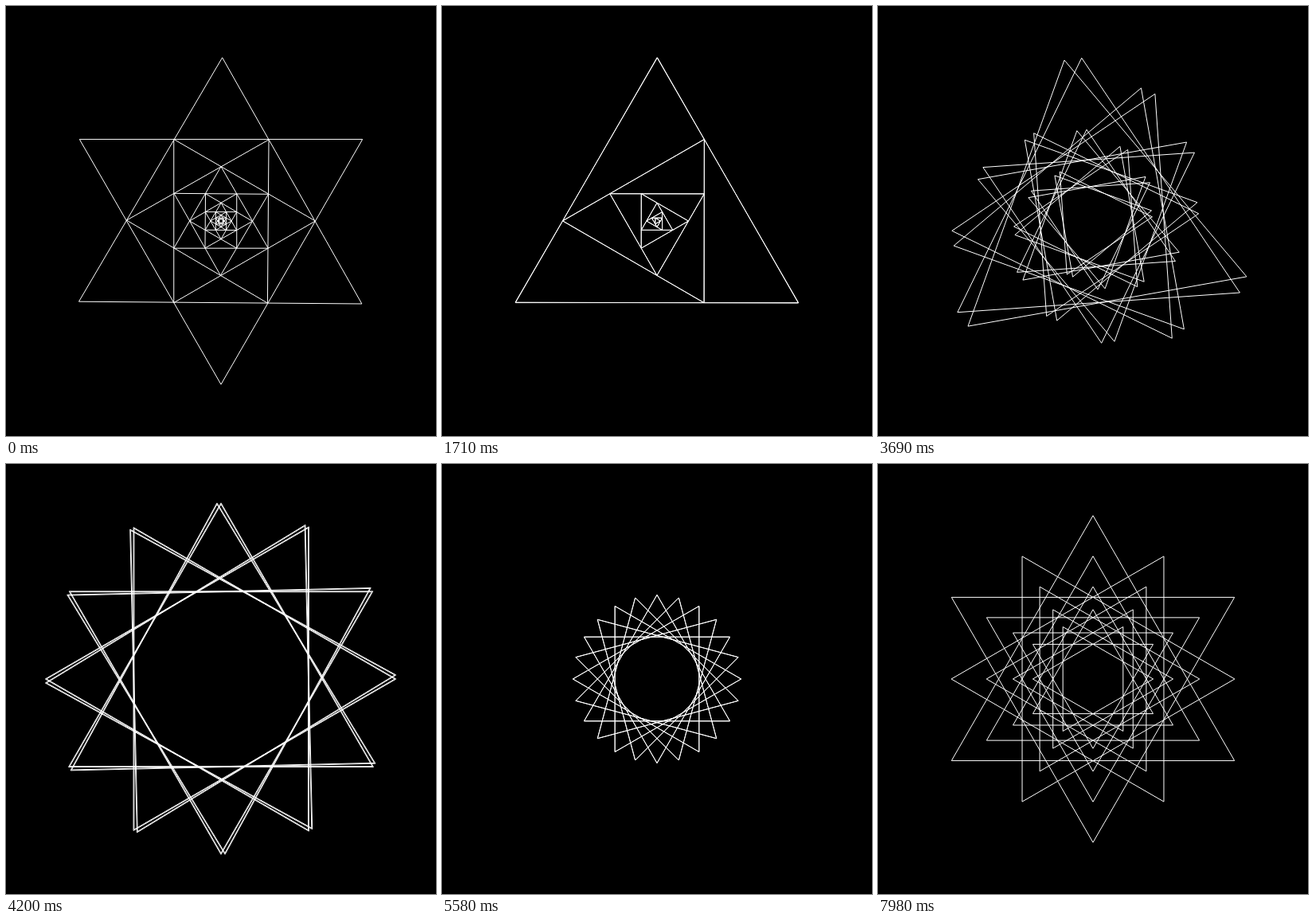
These frames come from a looping animation (540 by 540 pixels, 8 s). An HTML page with a canvas:

```html
<!DOCTYPE html>
<html lang="en">
<head>
<meta charset="utf-8">
<title>Triangle spirals</title>
<style>
  html, body { margin: 0; width: 100%; height: 100%; overflow: hidden; background: #000; }
  canvas { display: block; }
</style>
</head>
<body>
<canvas id="stage" width="540" height="540"></canvas>
<script>
const ctx = document.getElementById('stage').getContext('2d');
const LOOP = 8000, CENTER = 270, RADIUS = 205.2, LEVELS = 8;
const TIGHT = 1 / Math.sqrt(3);
const RAD = Math.PI / 180;

const clamp = x => Math.min(1, Math.max(0, x));
const mix = (a, b, p) => a + (b - a) * p;
const progress = (t, start, span) => clamp((t - start) / span);
const sine = p => (1 - Math.cos(Math.PI * p)) / 2;
const cubic = p => p < 0.5 ? 4 * p ** 3 : 1 - 4 * (1 - p) ** 3;
const ease = (t, start, span) => cubic(progress(t, start, span));

function triangle(radius, degrees) {
  for (let i = 0; i < 3; i++) {
    const a = (degrees - 90 + i * 120) * RAD;
    ctx.lineTo(CENTER + radius * Math.cos(a), CENTER + radius * Math.sin(a));
  }
  ctx.closePath();
}

// Each level is turned 30 degrees and scaled by the ratio.
function spiral(radius, ratio, degrees, levels = LEVELS) {
  for (let i = 0; i < levels; i++) {
    ctx.beginPath();
    triangle(radius * ratio ** i, degrees + 30 * i);
    ctx.stroke();
  }
}

function drawFirstPair(t) {
  const lead = 120 * ease(t, -150, 1540) + 240 * ease(t, 1576, 2520);
  const follow = 60 + 60 * ease(t, 0, 1540) + 240 * ease(t, 1723, 2520)
    - 15 * ease(t, 3900, 1080);
  const ratio = mix(TIGHT, 1, ease(t, 2802, 1560));

  let radius = mix(RADIUS, 222, sine(progress(t, 3690, 600)));
  if (t > 4290) radius = mix(222, 187.4, sine(progress(t, 4290, 550)));
  radius *= 1 - ease(t, 4850, 1530);
  if (radius < 0.1) return;

  spiral(radius, ratio, lead);
  spiral(radius, ratio, follow);
}

function drawSecondPair(t) {
  const growth = ease(t, 5965, 1540);
  if (growth <= 0) return;
  const ratio = mix(TIGHT, 1, ease(t, 7095, 1550));
  const levels = growth > 0.985 ? LEVELS : Math.max(1, Math.floor(LEVELS * growth));

  spiral(RADIUS * growth, ratio, 0, levels);
  spiral(RADIUS * growth, ratio, 60, levels);
}

function draw(now) {
  const t = now % LOOP;
  ctx.fillStyle = '#000';
  ctx.fillRect(0, 0, 540, 540);
  ctx.strokeStyle = '#fff';
  ctx.lineWidth = 1;
  drawFirstPair(t);
  drawSecondPair(t);
}

const begin = performance.now();
function tick() {
  draw(performance.now() - begin);
  requestAnimationFrame(tick);
}
tick();
</script>
</body>
</html>
```
